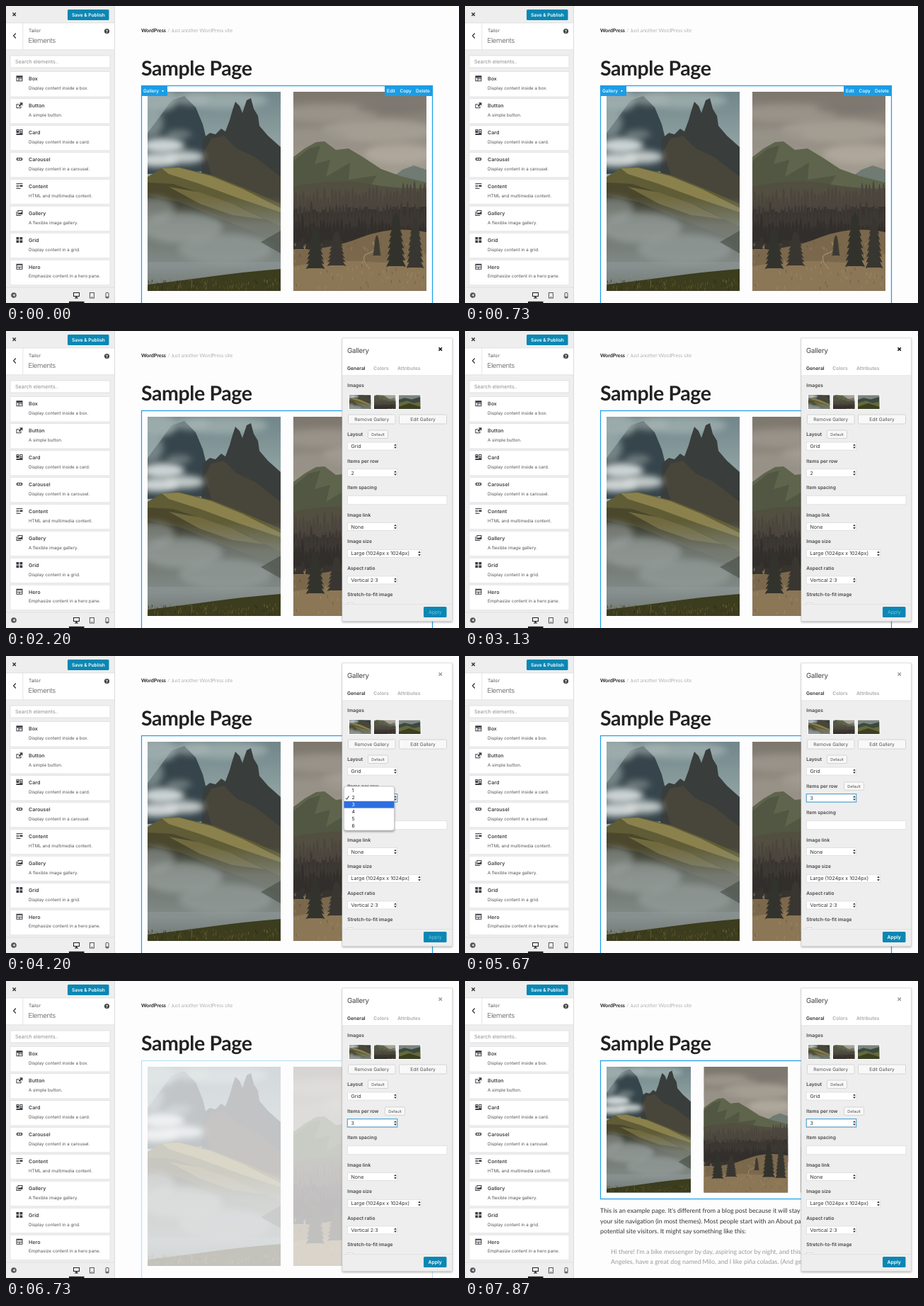
Animation, 640 px wide and 419 px high, one loop 8 s. Source, as an HTML page:

```html
<!DOCTYPE html>
<html lang="en">
<head>
<meta charset="utf-8">
<title>Page builder gallery</title>
<style>
  html, body { margin: 0; width: 100%; height: 100%; overflow: hidden; background: #fdfdfe; }
  svg.stage { display: block; width: 640px; height: 419px; }
  text { font-family: Inter, sans-serif; text-rendering: geometricPrecision; white-space: pre; }
  text.page { font-family: Lato, sans-serif; }
</style>
</head>
<body>
<script>
const LOOP = 8000;
const BLUE = '#1b9de6', BUTTON = '#0b87b3', LINE = '#dcdcdc', GREY = '#eee';

let seed = 7;
const rnd = () => (seed = seed * 16807 % 2147483647) / 2147483647;

const text = (x, y, str, size, fill = '#444', weight = 400, extra = '') =>
  `<text x="${x}" y="${y}" font-size="${size}" fill="${fill}" font-weight="${weight}" ${extra}>${str}</text>`;
const page = (x, y, str, size, fill, weight, extra = '') =>
  text(x, y, str, size, fill, weight, 'class="page" ' + extra);
const rect = (x, y, w, h, fill, extra = '') =>
  `<rect x="${x}" y="${y}" width="${w}" height="${h}" fill="${fill}" ${extra}/>`;
const path = (d, fill, extra = '') => `<path d="${d}" fill="${fill}" ${extra}/>`;
const stroke = (d, color, width = 1) => path(d, 'none', `stroke="${color}" stroke-width="${width}"`);
const group = (id, ...parts) => `<g id="${id}">${parts.join('')}</g>`;
const box = (x, y, w, h, border = '#ddd', fill = '#fff', r = 0) =>
  rect(x + .5, y + .5, w - 1, h - 1, fill, `stroke="${border}" stroke-width=".8" rx="${r}"`);
const cross = (x, y, color, r = 2.2) =>
  stroke(`M${x - r} ${y - r}l${2 * r} ${2 * r}m0 ${-2 * r}l${-2 * r} ${2 * r}`, color, 1.4);
const photo = (n, x, y, w, h) =>
  `<use href="#photo${n}" x="${x}" y="${y}" width="${w}" height="${h}"/>`;

// Landscape pictures
const cloud = (x, y, rx, ry, fill, a) =>
  `<ellipse cx="${x}" cy="${y}" rx="${rx}" ry="${ry}" fill="${fill}" opacity="${a}" filter="url(#soft)"/>`;
const fade = (id, ...stops) => `<linearGradient id="${id}" x2="0" y2="1">` +
  stops.map(([o, c, a = 1]) => `<stop offset="${o}" stop-color="${c}" stop-opacity="${a}"/>`).join('') +
  '</linearGradient>';
const symbol = (n, ...parts) =>
  `<symbol id="photo${n}" viewBox="0 0 188 281" preserveAspectRatio="xMidYMid slice">${parts.join('')}</symbol>`;

function tree(x, base, h, w, fill) {
  const tiers = 9;
  let right = '', left = '';
  for (let i = 1; i <= tiers; i++) {
    const y = base - h + h * i / tiers, half = w / 2 * Math.sqrt(i / tiers);
    right += `L${x + half} ${y}L${x + half * .7} ${y - 1}`;
    left = `L${x - half * .7} ${y - 1}L${x - half} ${y}` + left;
  }
  return path(`M${x} ${base - h}${right}${left}Z`, fill);
}

function forest() {
  let out = '';
  for (let row = 0; row < 3; row++)
    for (let x = -2; x < 192; x += 4 + rnd() * 2)
      out += tree(x, 166 + row * 20 + x * (row - 1) * .03 + rnd() * 8, 22 + rnd() * 14, 7,
        ['#4b453e', '#3d3833', '#322e2b'][row]);
  return out;
}

function grass(y, colors) {
  let out = '';
  for (let i = 0; i < 110; i++) {
    const x = rnd() * 188, t = y + rnd() * (281 - y);
    out += stroke(`M${x.toFixed(1)} ${t.toFixed(1)}l${(rnd() * 2 - 1).toFixed(1)} -4`, colors[i % colors.length], .7);
  }
  return out;
}

const photos = symbol(1,
  rect(0, 0, 188, 281, 'url(#sky1)'),
  cloud(110, 12, 60, 12, '#adbbb9', .6),
  path('M0 58L18 34 34 12 52 6 68 22 78 46 84 70 86 112 0 116Z', '#36454b'),
  cloud(12, 12, 30, 16, '#a5b4b4', .8), cloud(62, 10, 26, 9, '#a9b6b5', .6),
  path('M76 118L78 66 88 58 96 60 104 52 110 56 116 40 120 26 124 14 130 20 134 30 140 12 146 9 150 24 156 34 158 48 170 62 188 78V172L140 148 98 126Z', '#393d3c'),
  path('M80 84L90 66 108 62 126 80 152 92 188 120V164L138 142 92 122Z', '#48453a'),
  cloud(4, 44, 18, 20, '#9fafaf', .6), cloud(22, 76, 30, 11, '#d3dada', .95),
  cloud(52, 92, 28, 9, '#d0d7d5', .9), cloud(14, 96, 30, 10, '#dde2e1', .9), cloud(44, 60, 18, 6, '#b3bfbf', .45),
  path('M0 120L20 108 44 106 92 118 142 138 188 158V235H0Z', '#5f5c36'),
  path('M20 108L44 107 90 119 134 137 188 164V170L128 150 74 130 30 116Z', '#8a814d'),
  path('M0 128L36 130 84 146 130 162 188 190V238H0Z', '#4a472d'),
  path('M30 134L74 142 120 158 166 180 120 174 74 158Z', '#716a3f'),
  path('M0 146L46 156 110 182 188 212V240H0Z', '#353729'),
  rect(0, 148, 188, 133, 'url(#fog)'),
  cloud(48, 192, 58, 22, '#a0a8a6', .6), cloud(110, 222, 66, 22, '#949c9a', .7), cloud(10, 166, 28, 18, '#a3aaa8', .5),
  path('M188 196L160 212 188 228Z', '#454a43', 'opacity=".6"'),
  path('M0 272Q50 266 94 260T188 250V281H0Z', '#3c3c1e'),
  grass(267, ['#5d592b', '#2d2e18', '#716a35'])
) + symbol(2,
  rect(0, 0, 188, 281, 'url(#sky2)'),
  cloud(50, 30, 70, 13, '#a59f95', .6), cloud(140, 22, 50, 9, '#7b766f', .8),
  cloud(120, 55, 80, 16, '#aca69b', .7), cloud(30, 62, 45, 10, '#9a948a', .7), cloud(150, 88, 50, 14, '#bbb4a7', .6),
  path('M138 122L154 110 170 104 188 110V146H130Z', '#6f7b73'),
  path('M0 92L16 80 32 71 44 70 60 82 78 80 98 92 124 109 152 119 188 128V180H0Z', '#5f644d'),
  path('M0 98L22 80 38 76 30 102 52 96 46 120 80 100 78 124 118 118 106 138 0 142Z', '#515742'),
  path('M0 134Q60 122 106 130T188 136V200H0Z', '#524e40'),
  rect(0, 162, 188, 60, '#37332f'),
  forest(),
  path('M0 222Q50 224 94 206T188 198V281H0Z', '#7b684c'),
  path('M0 246Q70 236 110 240T188 228V281H0Z', '#8b7656'),
  stroke('M108 250Q92 232 106 228T112 212', '#a08766', 1.5),
  grass(215, ['#a08963', '#64553f', '#a9926d']),
  tree(31, 250, 60, 27, '#33332d'), tree(61, 246, 50, 27, '#393631'),
  tree(145, 247, 78, 28, '#32322c'), tree(172, 249, 72, 25, '#383630'), tree(118, 232, 30, 12, '#3d3a33')
) + symbol(3,
  rect(0, 0, 188, 281, '#7d8580'),
  path('M0 120L50 104 110 118 188 96V281H0Z', '#3c4940'),
  path('M0 150L70 128 130 150 188 138V281H0Z', '#65683a'),
  path('M0 180L90 152 188 182V281H0Z', '#3b4023')
);

const defs = `<defs>
  <filter id="soft" x="-50%" y="-80%" width="200%" height="260%"><feGaussianBlur stdDeviation="5"/></filter>
  <filter id="shadow" x="-10%" y="-10%" width="120%" height="120%"><feGaussianBlur stdDeviation="1.6"/></filter>
  ${fade('sky1', [0, '#71868a'], [.35, '#9aabaa'], [1, '#8d9896'])}
  ${fade('fog', [0, '#8a9290', 0], [.3, '#8a9290', .65], [.75, '#868f8d', .95], [1, '#6f7773'])}
  ${fade('sky2', [0, '#7c766d'], [.25, '#958f85'], [.5, '#aaa295'])}
  ${photos}</defs>`;

// Sidebar
const items = [
  ['Box', 'Display content inside a box.', 'M0 0H9V8H0ZM1 3V7H3V3ZM4 3V4H8V3ZM4 5V7H8V5Z'],
  ['Button', 'A simple button.', 'M0 2H4V3H1V7H6V5H7V8H0ZM4.500 0H9V4.500L7.500 3 4.500 6 3.200 4.700 6 1.600Z'],
  ['Card', 'Display content inside a card.', 'M0 0H4V5H0ZM5 0H9V8H0V6H5ZM6 1V3H8V1ZM6 4V5H8V4ZM1 1V2H3V1Z'],
  ['Carousel', 'Display content in a carousel.', 'M1 2H8L9 4 8 6H1L0 4ZM2 3V5H4V3ZM5 3V5H7V3Z'],
  ['Content', 'HTML and multimedia content.', 'M0 0H9V1H0ZM0 2.500H4V3.500H0ZM5 2.500H9V5H5ZM0 4.500H4V5.500H0ZM0 7H6V8H0Z'],
  ['Gallery', 'A flexible image gallery.', 'M2 0H9V6H2ZM3 1V5L5 3 6 4 8 2V1ZM0 2H1V7H7V8H0Z'],
  ['Grid', 'Display content in a grid.', 'M0 0H3.800V3.500H0ZM5 0H8.800V3.500H5ZM0 4.600H3.800V8H0ZM5 4.600H8.800V8H5Z'],
  ['Hero', 'Emphasize content in a hero pane.', 'M0 0H9V8H0ZM1 2V4H8V2ZM1 5V7H4V5ZM5 5V7H8V5Z'],
];

const card = ([name, note, icon], i) => {
  const y = 92 + i * 37.950;
  return box(5.500, y, 142, 36.500, '#e0e0e0') +
    path(icon, '#3a3f44', `fill-rule="evenodd" transform="translate(14.500 ${y + 6.200})"`) +
    text(32, y + 13.400, name, 7.100, '#444', 600) +
    text(32, y + 25.800, note, 6.220, '#555');
};

const sidebar = [
  rect(0, 0, 153, 419, GREY), rect(153, 0, 1, 419, LINE),
  cross(11.700, 11.800, '#333'),
  rect(87, 5, 58.500, 15, BUTTON, 'rx="1.500"'),
  text(93, 14.700, 'Save &amp; Publish', 6.600, '#fff', 600),
  rect(0, 24, 153, 38, '#fff'), rect(0, 23.500, 153, .8, LINE), rect(0, 61.500, 153, .8, LINE), rect(23.500, 24, .8, 38, LINE),
  stroke('M13.800 38.500L10.600 42 13.800 45.500', '#333', 1.200),
  text(32, 37.400, 'Tailor', 6.500, '#555'),
  text(31.500, 51.800, 'Elements', 9.600, '#555', 300, 'letter-spacing="-.3"'),
  '<circle cx="142.500" cy="35.500" r="3.600" fill="#444"/>',
  text(142.500, 37.900, '?', 6, '#fff', 700, 'text-anchor="middle"'),
  box(5.500, 69.500, 142, 18), text(13, 81.100, 'Search elements..', 7.200, '#8f8f8f'),
  ...items.map(card),
  rect(0, 397, 153, 22, GREY), rect(0, 396.500, 153, .8, LINE),
  '<circle cx="11" cy="408" r="3.800" fill="#555"/>', path('M12.500 406L9.500 408 12.500 410Z', GREY),
  path('M95 404H104V410H95ZM96 405V409H103V405ZM98.500 410H100.500V411.500H102V412.500H97V411.500H98.500Z', '#222', 'fill-rule="evenodd"'),
  rect(89, 416.800, 21.500, 2.200, '#222'),
  rect(118.400, 404.500, 6, 7.500, 'none', 'stroke="#555"'), rect(120.700, 410, 1.500, 1, '#555'),
  rect(141, 404.500, 4, 7.500, 'none', 'stroke="#555" rx=".8"'), rect(141, 410, 4, 1.500, '#555'),
];

// Page
const frame = h => rect(191.500, 112.500, 411, h, 'none', `stroke="${BLUE}" stroke-width="1.200"`);
const copy = [
  [191, 327, 'This is an example page. It\'s different from a blog post because it will stay in one place and will show up in'],
  [191, 341.600, 'your site navigation (in most themes). Most people start with an About page that introduces them to'],
  [191, 356.200, 'potential site visitors. It might say something like this:'],
  [206, 384.600, 'Hi there! I\'m a bike messenger by day, aspiring actor by night, and this is my website. I live in Los', '#999'],
  [206, 399.200, 'Angeles, have a great dog named Milo, and I like piña coladas. (And gettin\' caught in the rain.)', '#999'],
];

const content = [
  rect(154, 0, 486, 419, '#fdfdfe'),
  page(191, 37.300, 'WordPress', 7.200, '#222', 700),
  page(228.300, 37.300, '/ Just another WordPress site', 7.250, '#777', 300),
  page(191, 97.600, 'Sample Page', 28.500, '#222', 700, 'letter-spacing="-.4"'),
  group('gallery',
    group('two', frame(400), photo(1, 200, 121, 188, 281), photo(2, 406, 121, 188, 281)),
    group('three', frame(195), [1, 2, 3].map((n, i) => photo(n, 200 + i * 137.300, 121, 119, 177.500)).join(''))),
  group('copy', ...copy.map(([x, y, str, fill = '#333']) => page(x, y, str, 8.850, fill, 400))),
  group('toolbar',
    rect(191, 112, 37, 15, BLUE), text(194, 122, 'Gallery', 6.500, '#fff', 500),
    '<circle cx="221.500" cy="119.800" r="1.100" fill="#fff"/>',
    rect(535, 112, 68, 15, BLUE),
    group('hover', rect(535, 112, 18.500, 15, '#168bd0')),
    text(538, 122, 'Edit', 6.500, '#fff', 500), text(556.500, 122, 'Copy', 6.500, '#fff', 500),
    text(579, 122, 'Delete', 6.500, '#fff', 500)),
];

// Settings panel
const label = (y, str) => text(482.300, y + 2.400, str, 6.700, '#444', 600);
const button = (x, y, w, h, str, size) => box(x, y, w, h, '#ccc', '#f8f8f8', 1.500) +
  text(x + w / 2, y + h / 2 + size * .36, str, size, '#555', 400, 'text-anchor="middle"');
const select = (y, w, str = '') => box(482, y, w, 12) + text(487.500, y + 8.500, str, 7.100, '#333') +
  path(`M${479 + w} ${y + 2.800}l1.800 2.500h-3.600zm0 6.800l1.800-2.500h-3.600z`, '#333');
const thumb = (n, x) => rect(x - 1, 89.500, 32.500, 21.500, '#fff') + photo(n, x, 90.500, 30.500, 19.500);
const applyText = (fill, weight) => text(606.200, 399.400, 'Apply', 6.800, fill, weight, 'text-anchor="middle"');

const option = n => 182.600 + n * 9.850;
const optionText = (n, fill) => text(488.500, option(n), n, 7, fill);
const pick = n => group('pick' + n, rect(477.500, option(n) - 7.400, 71, 9.800, '#2e6fe0'), optionText(n, '#fff'));
const tick = color => stroke('M480 200.300l1.500 2 3-4.800', color, 1);
const menu = group('menu',
  rect(477.500, 185, 71.500, 63, '#000', 'opacity=".35" rx="3" filter="url(#shadow)"'),
  box(477, 183.500, 72, 63, '#c4c4c4', '#fff', 3),
  ...[1, 2, 3, 4, 5, 6].map(n => optionText(n, '#222')),
  pick(2), pick(3),
  group('tick', tick('#222')), group('tickLit', tick('#fff')));

const panel = group('panel',
  rect(475, 11, 155.500, 400, '#000', 'opacity=".3" filter="url(#shadow)"'),
  rect(475, 10, 155.500, 399.500, GREY, 'stroke="#d2d2d2" stroke-width=".7"'),
  rect(475.400, 10.400, 154.700, 52.600, '#fff'), rect(475.400, 62.500, 154.700, .7, LINE),
  text(482, 30.500, 'Gallery', 9.800, '#444', 400, 'letter-spacing="-.25"'),
  cross(613.700, 25.600, '#999'), group('closeLit', cross(613.700, 25.600, '#111')),
  text(482, 55.400, 'General', 6.800, '#333', 600), text(519.300, 55.400, 'Colors', 6.800, '#aaa', 600),
  text(553, 55.400, 'Attributes', 6.800, '#aaa', 600),
  label(77, 'Images'), thumb(1, 485), thumb(2, 520), thumb(3, 555),
  button(483, 117.500, 67.500, 14, 'Remove Gallery', 6.600), button(555, 117.500, 68, 14, 'Edit Gallery', 6.600),
  label(146, 'Layout'), button(511, 139.500, 29, 12.500, 'Default', 5.500), select(156.500, 71, 'Grid'),
  label(183.300, 'Items per row'), select(194.300, 71),
  group('focus', rect(482.300, 194.600, 70.500, 11.500, 'none', 'stroke="#4fa3d8" stroke-width="1.100"')),
  group('value2', text(487.500, 202.800, '2', 7.100, '#333')),
  group('value3', text(487.500, 202.800, '3', 7.100, '#333'), button(535, 177.300, 29, 12.500, 'Default', 5.500)),
  label(221, 'Item spacing'), box(482, 231.800, 141.500, 13.500),
  label(259.300, 'Image link'), select(270, 71, 'None'),
  label(296.800, 'Image size'), select(307.800, 105, 'Large (1024px x 1024px)'),
  label(334.500, 'Aspect ratio'), select(345.400, 71, 'Vertical 2:3'),
  label(371.700, 'Stretch-to-fit image'), path('M482.500 385V383.500H490.500V385', '#fff', 'stroke="#ccc" stroke-width=".7"'),
  rect(475.400, 385, 154.700, .7, LINE),
  rect(590, 389, 32.500, 15, BUTTON, 'rx="1.500"'),
  group('applyOff', applyText('#74c3df', 400)), group('applyOn', applyText('#fff', 600)),
  menu);

document.body.innerHTML =
  `<svg class="stage" viewBox="0 0 640 419">${defs}${content.join('')}${sidebar.join('')}${panel}</svg>`;

// Each step: [start ms, opacity, optional fade ms]
const steps = {
  hover: [[0, 0], [1000, 1]],
  toolbar: [[0, 1], [1930, 0]],
  panel: [[0, 0], [1930, 1, 130]],
  closeLit: [[0, 1], [3600, 0]],
  focus: [[0, 0], [3600, 1]],
  menu: [[0, 0], [3600, 1], [4600, 0, 130]],
  pick2: [[0, 1], [4000, 0]],
  pick3: [[0, 0], [4000, 1]],
  tick: [[0, 0], [4000, 1]],
  tickLit: [[0, 1], [4000, 0]],
  value2: [[0, 1], [4600, 0]],
  value3: [[0, 0], [4600, 1]],
  applyOff: [[0, 1], [4600, 0]],
  applyOn: [[0, 0], [4600, 1]],
  gallery: [[0, 1], [5950, .3, 200], [6870, 1, 200]],
  two: [[0, 1], [6870, 0]],
  three: [[0, 0], [6870, 1]],
  copy: [[0, 0], [6870, 1]],
};

for (const [id, list] of Object.entries(steps)) {
  const keys = [];
  let last = list[0][1];
  for (const [ms, opacity, ramp = 0] of list) {
    keys.push({ opacity: last, offset: ms / LOOP }, { opacity, offset: (ms + ramp) / LOOP });
    last = opacity;
  }
  keys.push({ opacity: last, offset: 1 });
  document.getElementById(id).animate(keys, { duration: LOOP, iterations: Infinity });
}
</script>
</body>
</html>
```
